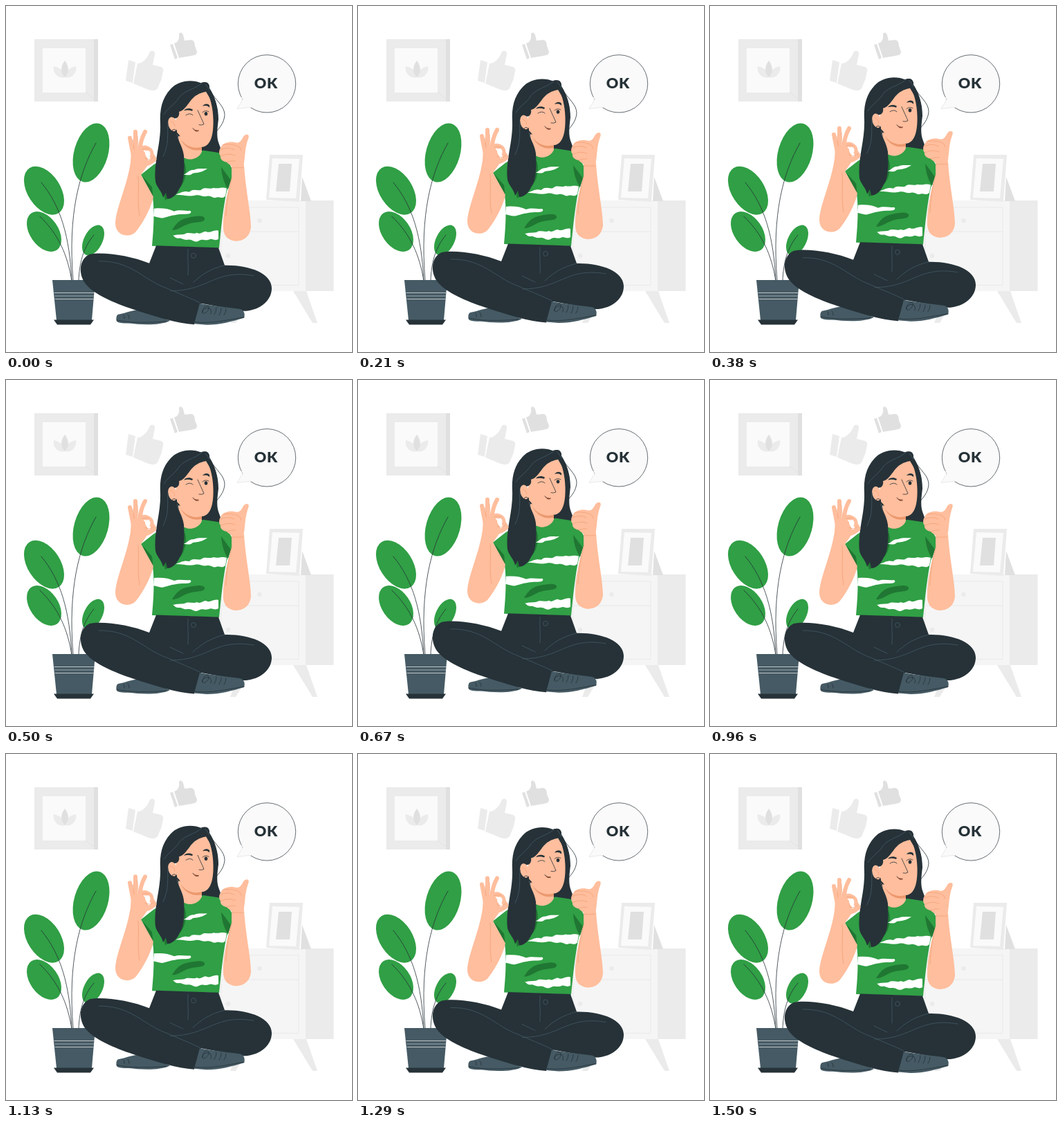
Write an HTML page that moves like this. It is 500 px wide and 500 px high and loops after 1540 ms.

```html
<!DOCTYPE html>
<html lang="en">
<head>
<meta charset="utf-8">
<title>OK</title>
<style>
  html, body { margin: 0; width: 100%; height: 100%; overflow: hidden; background: #fff; }
  svg { display: block; width: 100%; height: 100%; }
  .line { fill: none; stroke: #263238; stroke-width: .8; stroke-linecap: round; stroke-linejoin: round; }
  .dark { fill: #263238; }
  .slate { fill: #455a64; }
  .green { fill: #309f45; }
  .shade { fill: #207633; }
  .skin { fill: #ffbe9d; }
  .crease { stroke: #eb996e; stroke-width: .6; }
  .seam { stroke: #455a64; }
  .fingers { fill: none; stroke: #ffbe9d; stroke-linecap: round; stroke-linejoin: round; }
  .g1 { fill: #fafafa; } .g2 { fill: #f5f5f5; } .g3 { fill: #ebebeb; } .g4 { fill: #e0e0e0; }
  text { font: 900 21.5px Lato, Inter, sans-serif; letter-spacing: .8px; text-anchor: middle; }
</style>
</head>
<body>
<svg viewBox="0 0 500 500">
  <g id="wall">
    <path class="g3" d="M41 48H127V138H41Z"/>
    <path class="g4" d="M127 48H133V138H127Z"/>
    <path class="g1" d="M53 61H115V125H53Z"/>
    <path class="line" style="stroke:#e0e0e0" d="M115 125L133 138"/>
    <path class="g3" d="M85 103C75 106 67 96 69 87C79 89 84 95 85 103C86 95 91 89 101 87C103 96 95 106 85 103"/>
    <path class="g4" d="M85 79C92 88 91 97 85 103C79 97 78 88 85 79"/>
    <path class="g3" d="M177 78L187 81L183 111L173 108ZM190 83C196 84 205 75 207 68C209 63 216 64 215 70L212 85L224 88C228 90 228 93 226 98C226 105 222 111 220 117C218 123 211 123 206 121L184 112Z"/>
    <path class="g4" d="M237 56L241 55L248 75L244 77ZM243 54C249 53 251 46 250 41C250 37 255 38 256 42L258 50L268 49C272 50 273 54 273 58L276 66C276 70 273 71 268 72L250 75Z"/>
  </g>

  <g id="cabinet">
    <path class="g3" d="M415 412H434L450 458H443ZM341 412H360L332 458H324Z"/>
    <path class="g2" d="M302 281H433V412H302Z"/>
    <path class="g3" d="M433 281H473.500V412H433Z"/>
    <path class="line" style="stroke:#e6e6e6" d="M311 291H423V403.500H311ZM311 326H423"/>
    <circle class="g3" cx="366.500" cy="310" r="3.200"/><circle class="g3" cx="321" cy="361" r="3.200"/>
    <path class="g4" d="M428 247L441 282H426Z"/>
    <path class="g3" d="M381 215L429 215L424 283L376 280Z"/>
    <path class="g1" d="M385 220L424 221L419 278L380 277Z"/>
    <path class="g4" d="M394 228L413 228L410 268L390 268Z"/>
  </g>

  <g id="bubble">
    <circle class="g1" cx="377" cy="112.300" r="41.700" stroke="#263238" stroke-width=".7"/>
    <path class="g1" d="M339 131L345 134L356 145L352 148Z"/>
    <path class="g1" stroke="#e0e0e0" stroke-width=".7" d="M343 134L334 148.500L356 146"/>
    <text class="dark" x="375.800" y="118.800">OK</text>
  </g>

  <g id="plant">
    <ellipse class="green" rx="24.500" ry="43.700" transform="translate(123 212) rotate(16)"/>
    <ellipse class="green" rx="23.700" ry="38.800" transform="translate(55 266.700) rotate(-33)"/>
    <ellipse class="green" rx="20.400" ry="32.400" transform="translate(55 326) rotate(-35)"/>
    <ellipse class="green" rx="13.300" ry="23.700" transform="translate(126 338.500) rotate(27)"/>
    <path class="line" d="M130 198C106 240 89 300 97 397M51 255C80 290 92 335 95 397M49 304C76 330 89 360 95 397M127 331C111 350 106 372 105 397"/>
    <path class="slate" d="M67 396H129L124 454H73Z"/>
    <path class="line" style="stroke:#e0e0e0" d="M70 414.500H127M71 423.500H126"/>
    <path class="line" style="stroke:#b5bdc1" d="M71 419H127"/>
    <path class="dark" d="M69 453.500H127L122 460.500H74Z"/>
  </g>

  <g id="woman">
    <path class="slate" d="M162 446C178 443 185 438 197 440L237 455C226 461 205 461 190 460C178 458 164 460 160 456C159 452 159 448 162 446"/>
    <path class="line" d="M160 454C172 457 195 459 232 456M170 447Q172 450 171 452M176 446Q179 449 178 452"/>

    <!-- Hair behind the face -->
    <path class="dark" d="M280 112C287 108 294 112 294 119C303 133 307 149 307 164C305 180 304 190 308 200L313 214L256 214L244 176L250 150Z"/>
    <path class="line" d="M295 123C304 138 316 145 316 158C315 170 308 177 302 184"/>

    <!-- Shirt -->
    <path class="green" d="M251 212L214 229L195 244L212 276C215 300 213 325 211 347L308 350C311 320 314 290 319 268L326 250V234C320 222 314 214 306 212L286 209Z"/>
    <path class="skin" d="M249 188L251 213C258 226 277 224 283 211L282 196Z"/>
    <path fill="#eb996e" d="M252 192C260 204 272 207 283 204L283 208C270 211 258 205 252 192"/>
    <path class="shade" d="M253 222C262 226 261 243 257 254C252 266 240 275 230 281L226 265ZM240 324C246 314 252 308 264 306C274 304 285 302 287 307C288 313 277 312 268 314C257 316 248 325 240 324M311 233L325 252L321 265C315 256 312 246 311 233M197 246L213 279L211 262Z"/>
    <path fill="#fff" d="M256 244C263 242 263 237 272 237C279 234 285 236 291 235C285 240 278 241 270 242C266 246 262 244 256 244M245 273C253 270 257 267 265 269C271 263 276 268 282 266C287 261 294 266 300 263C307 265 312 261 319 264L317 275C312 280 310 275 304 277C299 279 297 274 291 275C284 277 280 272 273 274C264 276 256 273 245 273M214 293C225 292 235 293 243 297C251 294 258 297 266 296C269 298 267 301 260 301C247 301 239 303 229 306C224 308 218 305 213 304ZM241 332C248 330 252 331 258 330C264 326 270 331 276 328C282 332 286 323 291 327C297 328 300 323 307 325V337C301 341 298 335 293 338C286 340 284 336 278 340C271 343 270 337 263 338C256 339 254 335 249 336C244 336 244 333 241 332"/>

    <!-- Face -->
    <path class="skin" d="M248 146L262 130L289 121C296 134 299 148 299.500 164C300 184 297 202 284 204C267 204 256 196 250 186L244 180Z"/>
    <path class="dark" d="M283 112C267 105 248 109 238 120C225 134 222 150 223 170C224 200 213 226 216 254C218 263 225 267 227 277L231 270L233 279C240 279 247 273 251 263C258 255 258 232 257 216C255 201 247 195 247 181L242 163C249 163 251 158 250 153C260 151 265 136 274 130C280 126 285 125 289 124C295 134 300 142 306 154C304 136 299 128 294 119C295 111 288 108 283 112"/>
    <ellipse class="skin" cx="241" cy="171" rx="6.500" ry="10.500" transform="rotate(-15 241 171)"/>
    <path class="line crease" d="M238 167Q243 168 244 174"/>
    <circle class="line" cx="243" cy="181.500" r="3"/>
    <path class="line seam" d="M283 112C271 122 255 122 247 137C240 145 233 149 228 157M288 113Q293 118 294 122M227 218C236 200 233 184 234 170"/>
    <path class="dark" d="M257 151.500C260 147.500 266 147.500 270 150L269 152C265 150.500 261 150.500 257 151.500M284 145C287 141 292 141 294 144L294 147C291 144 288 144 284 145"/>
    <path class="line" d="M260 158Q266 154 270 158M284 154Q288 150 293 153M277 151C280 158 284 166 286 171Q283 173 279 172M270 177Q272 181 278 181"/>
    <path fill="#8a4a35" d="M270 177C273 180 276 180 279 179.500Q275 185 270 177"/>
    <ellipse class="dark" cx="289" cy="156" rx="2.300" ry="2.700"/>

    <!-- Circled fingers -->
    <path class="skin" d="M181 214C180 250 159 290 158 314C158 334 180 336 188 326C199 312 210 291 213 276L195 244L203 233L207 226L197 206Z"/>
    <path class="fingers" stroke-width="6" d="M179 191L184 217M187 182V212M201 182Q194 194 193 212"/>
    <path class="fingers" stroke-width="7" d="M194 207C201 203 210 207 210 214C211 219 214 219 214 222Q205 230 195 229"/>
    <path class="skin" d="M181 212L193 205L201 212L202 222L195 236L180 232Z"/>
    <ellipse cx="205" cy="214" rx="3.500" ry="5" fill="#fff"/>
    <path class="line crease" d="M191 246C193 263 189 280 193 303M183 193L185 207M190 188L191 205M197 207Q202 205 207 207M201 220Q207 224 213 219"/>

    <!-- Thumb up -->
    <path class="skin" d="M326 230L344 230C346 264 354 300 354 320C352 336 341 340 331 340C318 338 313 330 314 315C314 300 319 270 326 250Z"/>
    <path class="skin" d="M310 205C315 195 328 196 334 198C341 197 341 190 345 187C350 184 352 188 350 192C346 204 346 210 345 219L343 235L327 234C326 230 321 229 319 226C313 225 309 221 310 217C307 214 308 208 310 205"/>
    <path class="line crease" d="M313 201Q324 199 333 202Q339 204 340 209M310 208Q321 203 330 208M311 217Q321 212 331 216M319 226Q326 223 331 224M327 234H343M326 250C321 269 319 283 318 304"/>

    <!-- Legs -->
    <path class="dark" d="M217 346.500L307 349.500L316 375C350 374 384 386 384 408C384 430 360 442 342 441L282 430L272 460.500C248 459 215 449 185 439C155 429 128 417 116 403C104 389 105 366 121 359C140 355 180 361 207 372Z"/>
    <path class="line seam" d="M134 369C181 368 198 396 232 408C250 416 266 422 280 429M238 412C293 412 301 380 358 390M237 393L256 402M270 400C282 389 295 380 316 375M263 352C262 366 264 375 263 389"/>
    <circle class="line seam" cx="271" cy="361" r="3.500"/>
    <path class="slate" d="M280 430C302 434 323 436 337 438C344 439 346 445 344 451C327 456 309 461 290 461L272 459.500Z"/>
    <path class="line" d="M273 457C295 460 320 454 344 450M284 443C285 430 297 432 292 440C287 447 282 445 284 440C290 434 299 436 296 445M304 436Q304 442 301 446M311 437Q311 443 308 447M318 438Q318 443 315 447"/>
  </g>
</svg>
<script>
  const LOOP = 1540, FPS = 24, MID = 17.5, HALF = 18, RISE = 10;
  const woman = document.getElementById('woman');
  const start = performance.now();

  // Linear rise and fall, stepped at 24 frames per second
  function draw() {
    const step = Math.floor((performance.now() - start) % LOOP * FPS / 1000 + .05);
    const lift = Math.max(0, RISE * (1 - Math.abs(step - MID) / HALF));
    woman.setAttribute('transform', `translate(0 ${-lift})`);
    requestAnimationFrame(draw);
  }
  draw();
</script>
</body>
</html>
```
